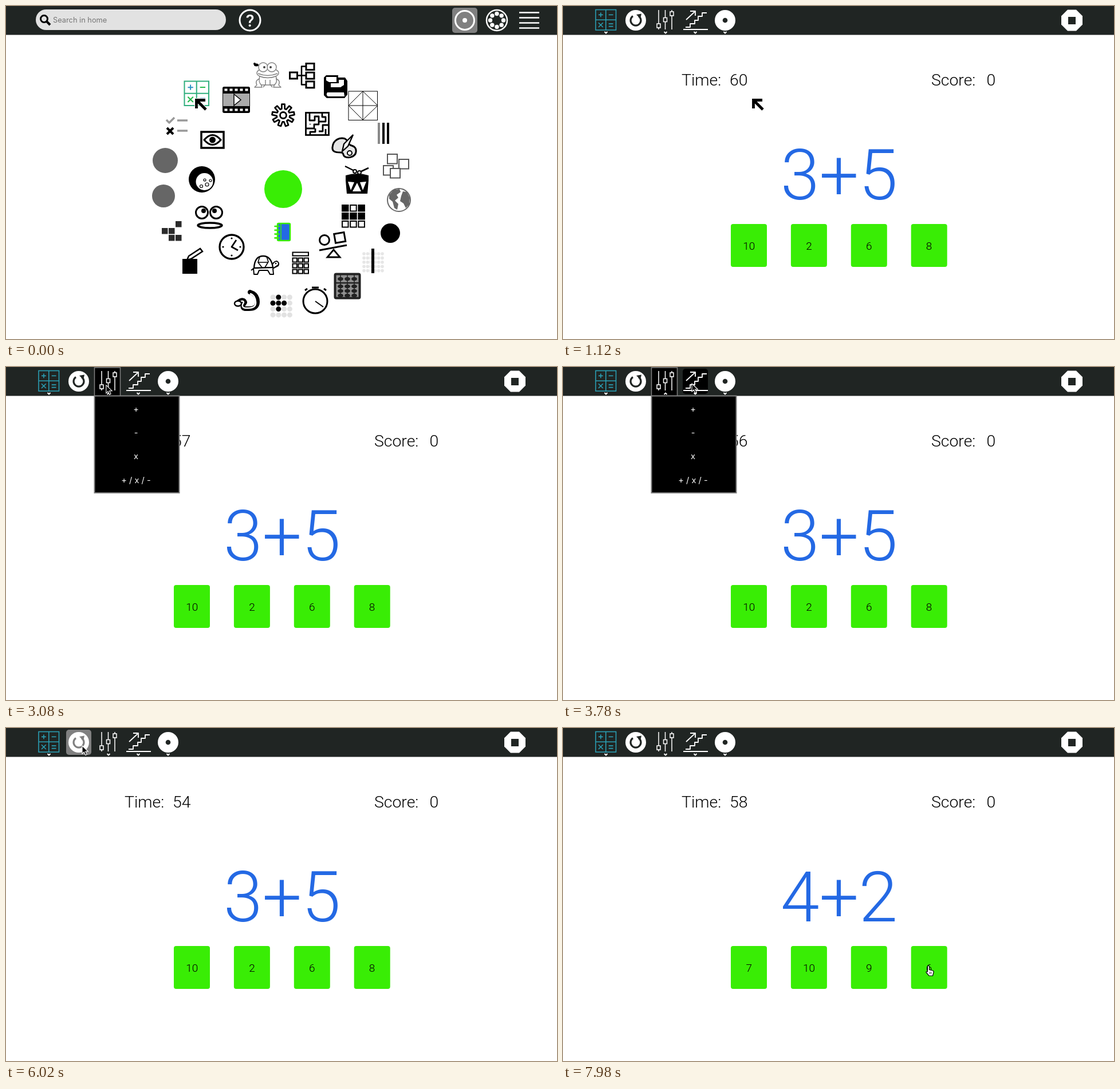
An HTML page that plays this animation: 962x582 px, repeating every 8 s.

```html
<!DOCTYPE html>
<html lang="en">
<head>
<meta charset="utf-8">
<title>Mental arithmetic</title>
<style>
html, body { margin: 0; width: 100%; height: 100%; overflow: hidden; background: #fff; }
svg { display: block; width: 962px; height: 582px; }
text { font-family: Roboto, "Liberation Sans", sans-serif; font-weight: 300; }
.ui { font-family: Inter, Roboto, sans-serif; font-weight: 400; }
</style>
</head>
<body>
<svg id="stage" viewBox="0 0 962 582" xmlns="http://www.w3.org/2000/svg"></svg>
<script>
const BAR = '#202523', GREY = '#808080', GREEN = '#39ed05', BLUE = '#2469e4', TEAL = '#2a9fb4';
const LOOP = 8000, STEP = 140, HOME_END = 700;

// SVG helpers: fill, stroke and stroke width follow the geometry
const paint = (f, s, w) => `fill="${f || 'none'}" stroke="${s || 'none'}" stroke-width="${w || 0}"`;
const rect = (x, y, w, h, f, s, sw, r = 0, more = '') =>
  `<rect x="${x}" y="${y}" width="${w}" height="${h}" rx="${r}" ${paint(f, s, sw)} ${more}/>`;
const circ = (x, y, r, f, s, sw) => `<circle cx="${x}" cy="${y}" r="${r}" ${paint(f, s, sw)}/>`;
const oval = (x, y, rx, ry, f, s, sw) =>
  `<ellipse cx="${x}" cy="${y}" rx="${rx}" ry="${ry}" ${paint(f, s, sw)}/>`;
const path = (d, f, s, sw, more = '') => `<path d="${d}" ${paint(f, s, sw)} ${more}/>`;
const line = (d, s = '#000', w = 2, cap = 'butt') =>
  path(d, '', s, w, `stroke-linecap="${cap}" stroke-linejoin="round"`);
const text = (x, y, size, str, more = '') =>
  `<text x="${x}" y="${y}" font-size="${size}" ${more}>${str}</text>`;
const group = (id, body, more = '') => `<g id="${id}" ${more}>${body}</g>`;
const times = (n, fn) => Array.from({ length: n }, (_, i) => fn(i)).join('');
const grid = (cols, rows, fn) => times(rows, j => times(cols, i => fn(i, j)));
const ring = (x, y, r, n, fn) => times(n, i => {
  const a = i * 2 * Math.PI / n;
  return fn(x + r * Math.cos(a), y + r * Math.sin(a));
});
const mid = 'text-anchor="middle"';

function sums(x, y, size, colors, w) {
  const [box, plus, minus, mul, eq] = colors;
  const q = size / 4, a = size * .11;
  const lx = x + q, rx = x + 3 * q, ty = y + q, by = y + 3 * q;
  return rect(x, y, size, size, '', box, w) +
    line(`M${x + 2 * q} ${y}v${size}M${x} ${y + 2 * q}h${size}`, box, w) +
    line(`M${lx - a} ${ty}h${2 * a}M${lx} ${ty - a}v${2 * a}`, plus, w) +
    line(`M${rx - a} ${ty}h${2 * a}`, minus, w) +
    line(`M${lx - a} ${by - a}l${2 * a} ${2 * a}m0 ${-2 * a}l${-2 * a} ${2 * a}`, mul, w) +
    line(`M${rx - a} ${by - 2}h${2 * a}m0 4.5h${-2 * a}`, eq, w);
}

function gear(x, y) {
  const teeth = 9, at = (r, a) => `${(x + r * Math.cos(a)).toFixed(1)} ${(y + r * Math.sin(a)).toFixed(1)}`;
  const d = Array.from({ length: teeth }, (_, i) => {
    const a = i * 2 * Math.PI / teeth - Math.PI / 2;
    return [at(11.5, a - .24), at(19.5, a - .13), at(19.5, a + .13), at(11.5, a + .24)].join('L');
  }).join('L');
  return path(`M${d}Z`, '#fff', '#000', 2.8, 'stroke-linejoin="round"') + circ(x, y, 5.5, '', '#000', 2.8);
}

function homeBar() {
  return rect(0, 0, 962, 50.5, BAR) + rect(52, 6, 332, 36, '#e2e2e2', '', 0, 18) +
    circ(66.5, 22.5, 6, '', '#000', 3) + line('M71 27l6 6', '#000', 4) +
    text(82, 29, 12.8, 'Search in home', 'class="ui" fill="#757575"') +
    circ(426, 25, 18, '', '#fff', 3) +
    text(426, 35.5, 30, '?', `${mid} fill="#fff" style="font-weight:500"`) +
    rect(779, 3, 44, 44, GREY, '', 0, 5) + circ(801, 25, 16.5, '', '#fff', 3) + circ(801, 25, 4, '#fff') +
    circ(857, 25, 18, '', '#fff', 2.5) + ring(857, 25, 11.5, 8, (x, y) => circ(x, y, 3.7, '#fff')) +
    times(4, i => line(`M896 ${11.5 + i * 9}h35`, '#fff', 2.4));
}

function topIcons() {
  return sums(311.5, 131.5, 42.5, ['#2fae7d', '#2b93c4', '#20b84a', '#20b84a', '#2b7fd6'], 2) +
    // film
    rect(378, 141, 48, 46, '#000', '', 0, 3) + rect(379, 153, 46, 22, '#aaa') +
    times(5, i => rect(381.5 + i * 9, 144.5, 5, 4, '#fff') + rect(381.5 + i * 9, 179.5, 5, 4, '#fff')) +
    path('M398 154l12 10-12 10z', '#fff', '#000', 1.5) +
    // frog and fly
    path('M443 122q-3 12 3 16h22q7-4 3-16z', '#fff', GREY, 1.4) +
    oval(457, 117, 19, 8.5, '#fff', GREY, 1.4) +
    circ(449, 107, 8, '#fff', GREY, 1.4) + circ(464, 107, 8, '#fff', GREY, 1.4) +
    circ(451, 107, 2, '#444') + circ(462, 107, 2, '#444') + line('M440 118q17 7 34 0', GREY, 1.4) +
    line('M443 127q-9 3-5 11l-4 4h13l-2-5M471 127q9 3 5 11l4 4h-13l2-5', GREY, 1.4) +
    line('M449 142l4-5v-8M465 142l-4-5v-8', GREY, 1.4) +
    oval(437, 103, 4, 2.5, '#000') + circ(434, 101, 2, '#000') +
    // tree
    line('M509 121.5h14M516 121.5v-16h7M516 121.5v16h7', '#000', 2.5) +
    rect(495.5, 116, 13, 11, '', '#000', 3) +
    times(3, i => rect(524, 100.5 + i * 15.7, 14, 11, '', '#000', 3)) +
    // press
    path('M555 125l4-4h21v4h12l4 6v24l-5 6h-31l-5-5z', '#000') +
    path('M559 124h18v9h-13l-5-3z', '#fff') + path('M567 135h14v-6h9v9l-6 4h-17z', '#fff') +
    path('M561 151h29l1 7h-29q-4-3-1-7z', '#fff') +
    // shapes puzzle
    rect(598, 149, 50.5, 50.5, '', '#000', 1) +
    line('M598 174l25-25 26 25-26 25zM598 174h51M623 149v50', '#000', 1) +
    gear(484, 191) +
    // maze
    rect(523.5, 186.5, 40, 39, '', '#000', 2.8) +
    line('M530 186v14h9v-7h7v14h-8v7h-14M552 186v8h6v8h-12M564 208h-11v11h-7M531 226v-6h9v-6M531 207v-1', '#000', 2.8) +
    line('M558 226v-11', '#000', 2.8) +
    // palette
    path('M570 247c1-14 14-18 22-15 6 3 4 8 9 11 6 2 11 4 10 12-1 9-14 12-20 8-4-3 0-7-7-7-8 0-15-1-14-9z', '#e6e6e6', '#000', 3) +
    circ(600, 257, 4, '#fff', '#000', 2) +
    path('M606 225l-9 20-10 9 3-13z', '#fff', '#000', 2.3);
}

function rightIcons() {
  const tiles = [[666, 259], [686, 268], [659, 279], [671, 284]];
  return rect(649, 204, 4, 37, '#888') + rect(657, 204, 4, 37, '#000') + rect(665, 204, 4, 37, '#000') +
    tiles.map(([x, y]) => rect(x, y, 17, 16.5, '#fff', '#555', 2)).join('') +
    // drum
    path('M593 296q20-6 40 0v9l-2 23h-36l-2-23z', '#000') +
    path('M597 307l5 15 6-14zM605 324l8-15 7 15zM618 308l5 14 6-15z', '#fff') +
    line('M592 280l18 9M633 283l-17 8', '#000', 2.5) +
    circ(609, 289, 3, '#fff', '#000', 2) + circ(617, 291, 3, '#fff', '#000', 2) +
    // globe
    circ(686, 339, 20, '#fff', '#666', 2) +
    path('M669 330l8-9 10-1 2 5-7 5 3 5-6 5 6 6-2 10-5-3-3-11-6-5zM693 324l7 1 5 10-1 12-6 6-4-8-6-4 2-9z', '#666') +
    circ(671, 397, 17, '#000') +
    // tiles
    grid(3, 3, (i, j) => rect(587 + i * 14.2, 348 + j * 14, 10.5, 10.5, [0, 2, 3, 4, 5].includes(i + j * 3) ? '#000' : '#fff', '#000', 2)) +
    // balance
    circ(556, 409, 8.5, '', '#000', 3) +
    rect(574, 397, 17.5, 16, '', '#000', 3, 0, 'transform="rotate(-10 582 405)"') +
    line('M547 427l48-9', '#000', 3) + path('M572 426l-11 13h22z', '', '#000', 2.8) +
    grid(6, 5, (i, j) => circ(625 + i * 6.4, 433 + j * 7.4, 2.8, '#e6e6e6')) + rect(638, 424, 5, 43, '#000') +
    // abacus
    rect(574.5, 468.5, 43, 42, '#909090', '#222', 4, 2) + line('M575 484h42', '#222', 2.5) +
    times(3, i => line(`M${584 + i * 12} 470v40`, '#222', 1.5)) +
    grid(3, 4, (i, j) => oval(584 + i * 12, (j ? 482 : 477) + j * 8, 5, 3.3, '#222'));
}

function bottomIcons() {
  const black = ['10', '01', '11', '21', '12'];
  const bricks = ['20', '01', '11', '12', '22'];
  return circ(540, 516, 21, '', '#000', 3) + line('M540 516l14 10', '#000', 2) +
    line('M534 492h12M522 497l4-3M559 497l-4-3', '#000', 3) +
    grid(4, 4, (i, j) => circ(466 + i * 9.8, 509 + j * 10.3, 4.5, black.includes(`${i}${j}`) ? '#000' : '#e2e2e2')) +
    // snake
    line('M404 519q10-9 13-1-9 12 5 11 17 1 17-12 0-13-13-17', '#000', 8, 'round') +
    line('M406 519q8-6 9-1-7 11 8 10 14 0 13-11-1-11-9-14', '#fff', 2.5, 'round') +
    oval(405, 520, 6, 4.5, '#fff', '#000', 2.5) +
    // notes
    rect(308, 442, 26, 26, '#000') +
    path('M316 444l3-7 20-13 4 5-20 13z', '#fff', '#000', 2.5) +
    // bricks
    bricks.map(c => rect(272 + c[0] * 12, 376 + c[1] * 12, 10.5, 10.5, '#2b2b2b')).join('') +
    // clock
    circ(394, 421, 21, '', '#000', 3.3) + ring(394, 421, 15, 4, (x, y) => circ(x, y, 1.6, '#000')) +
    line('M402 409l-8 12 11 6', '#000', 2.8) +
    // turtle
    path('M433 458q1-21 16-21 14 0 17 20z', '#fff', '#000', 2.3) +
    line('M443 438l-3 10 7 9M455 438l3 9-6 10M440 448h18', '#000', 1.6) +
    line('M433 458l-5 4M432 459l1 10h6l3-7h15l4 7h6l-1-10 10-7M465 452q3-6 8-6 5 3 2 8l-8 4', '#000', 2) +
    circ(471, 450, 1.3, '#000') +
    // calculator
    rect(500.5, 430.5, 27.5, 6, '', '#000', 2) +
    grid(3, 3, (i, j) => rect(500.5 + i * 10, 440.5 + j * 10, 7.5, 7, '', '#000', 2));
}

function leftIcons() {
  const craters = [[351, 312, 3], [341, 315, 2.5], [357, 305, 2], [347, 304, 2]];
  return line('M280 199l5 5 9-9', '#999', 3.5) + line('M299 200h18M299 218h18', '#999', 3.5) +
    line('M281 213l11 11M292 213l-11 11', '#000', 4) +
    // eye
    rect(341, 220, 39, 28, '#fff', '#000', 3.5) + path('M346 234q14.5-17 29 0-14.500 17-29 0z', '#fff', '#000', 3) +
    circ(360.5, 234, 5.5, '#000') + circ(278, 270, 22, '#666') + circ(275, 332, 20, '#666') +
    // moon
    circ(342, 303, 23, '#000') + circ(346.5, 307, 15, '#fff') +
    craters.map(([x, y, r]) => circ(x, y, r, '#fff', '#000', 1.2)).join('') +
    // face
    circ(342, 361, 10.5, '#fff', '#000', 3) + circ(367, 361, 10.5, '#fff', '#000', 3) +
    circ(345, 358, 4, '#000') + circ(364, 358, 4, '#000') + oval(356, 383.5, 21, 4.5, '', '#000', 3.5);
}

function centre() {
  return circ(484, 320, 33, GREEN) + rect(474, 380, 22, 30, BLUE, GREEN, 2.5, 2) +
    line('M480 380v30', GREEN, 1.5) + times(4, i => line(`M469.5 ${385 + i * 6.8}h7`, GREEN, 2.6, 'round'));
}

const caret = (x, up) => line(up ? `M${x - 2.5} 48l2.5-2.5 2.5 2.5` : `M${x - 2.5} 45l2.5 2.5 2.5-2.5`, '#fff', 1.8);
const hoverBox = (id, x) => group(id, rect(x - 22, 3, 44, 44, '#000', '', 0, 5));

function menu(id, x, h, rows) {
  return group(id, rect(x + 1, 1, 45, 50, '#000', GREY, 1.5) + rect(x + 1, 50.5, 148, h, '#000', GREY, 2) +
    rows.map((r, i) => text(x + 73.5, 79 + i * 41.2, 14.6, r, `${mid} class="ui" fill="#fff"`)).join(''));
}

function appBar() {
  return rect(0, 0, 962, 50.5, BAR) + hoverBox('hRestart', 127) + hoverBox('hOps', 179) + hoverBox('hLevel', 231) +
    group('pressed', rect(105, 3, 44, 44, GREY, '', 0, 5)) +
    menu('mOps', 153.5, 169.5, ['+', '-', 'x', '+ / x / -']) +
    menu('mLevel', 206, 129, ['easy', 'medium', 'hard']) +
    sums(57, 6.5, 35.5, Array(5).fill(TEAL), 1.6) +
    circ(127, 25, 18, '#fff') +
    group('spin', path('M122 17.600a9 9 0 1 0 10 0', '', 'currentColor', 3.2) +
      path('M128 15l9-1.5-2 8.5z', 'currentColor'), `color="${BAR}"`) +
    line('M167 7v24M167 37v4M178.5 7v14M178.5 27v14M190 7v3M190 16v25', '#fff', 1.5) +
    rect(164, 31, 6, 7, '', '#fff', 1.5) + rect(175.5, 20.5, 6, 7, '', '#fff', 1.5) + rect(187, 10, 6, 7, '', '#fff', 1.5) +
    line('M210 41h43', '#fff', 1.8) +
    line('M214 37h8v-6h8v-6h6v-7h7v-6h8', '#fff', 1.8) + line('M215 24l15-14M222 9h9v8', '#fff', 1.8) +
    circ(283, 25, 18, '#fff') + circ(283, 25, 4.3, BAR) +
    caret(75) + caret(283) +
    group('cOps', caret(179)) + group('cOpsUp', caret(179, true)) +
    group('cLevel', caret(231)) + group('cLevelUp', caret(231, true)) +
    path('M881 6.5h15l11 11v15l-11 11h-15l-11-11v-15z', '#fff') + rect(882, 19, 13, 13, BAR);
}

const appBody = () =>
  text(207, 139, 28.4, 'Time:') + text(291, 139, 28.4, '60', 'id="time"') +
  text(643, 139, 28.4, 'Score:') + text(739.5, 139, 28.4, '0') +
  text(482, 338, 122, '', `id="sum" ${mid} fill="${BLUE}"`) +
  times(4, i => rect(293 + i * 104.9, 381, 63, 75, GREEN, '', 0, 4) +
    text(324.7 + i * 104.8, 425.5, 19, '', `id="card${i}" ${mid}`));

const bigArrow = 'M2.5 17V2.5H18M3 3l16 16';
const cursors =
  group('big', path(bigArrow, '', '#fff', 7) + path(bigArrow, '', '#000', 4.8)) +
  group('arrow', path('M0 0v14l3.3-3 2.5 5.5 2.5-1.2-2.5-5.3h4.5z', '#000', '#fff', 1.1)) +
  group('hand', path('M-1.5 1.5q1.5-2 3 0v6l6 1.5q2 .5 1.5 3l-1.5 6h-6.5l-5-6q0-2.5 2.5-1z', '#fff', '#000', 1.2) +
    line('M2.5 11v4M4.8 11v4', '#000', .8));

document.getElementById('stage').innerHTML =
  group('home', homeBar() + topIcons() + rightIcons() + bottomIcons() + leftIcons() + centre()) +
  group('app', appBody() + appBar()) + group('cursor', cursors);

// time, x, y of the pointer tip
const moves = [[0, 330, 162], [1260, 330, 162], [2240, 169, 32], [2940, 169, 32], [3640, 225, 29],
  [4480, 225, 29], [4760, 230, 29], [5320, 230, 29], [5880, 133, 31], [6300, 133, 31], [7420, 638, 415], [8000, 638, 415]];
const ticks = [[0, 60], [1680, 59], [2380, 58], [3080, 57], [3780, 56], [4620, 55], [5460, 54],
  [6160, 60], [6860, 59], [7560, 58]];
const rounds = [{ sum: '3+5', cards: [10, 2, 6, 8] }, { sum: '4+2', cards: [7, 10, 9, 6] }];

const $ = id => document.getElementById(id);
const show = (id, on) => { $(id).style.display = on ? '' : 'none'; };
const within = (t, a, b) => t >= a && t < b;

function pointer(t) {
  const i = Math.max(1, moves.findIndex(m => m[0] > t));
  const [t0, x0, y0] = moves[i - 1], [t1, x1, y1] = moves[i];
  const p = (t - t0) / (t1 - t0), e = p * p * (3 - 2 * p);
  return [x0 + (x1 - x0) * e, y0 + (y1 - y0) * e];
}

function draw(t) {
  const [x, y] = pointer(t), inBar = y < 50;
  const home = t < HOME_END;
  const ops = within(t, 2660, 4060), level = within(t, 4060, 5460), pressed = within(t, 6020, 6160);
  const over = bx => inBar && Math.abs(x - bx) < 22;
  const card = y > 381 && y < 456 && x > 293 && (x - 293) % 104.9 < 63;
  const round = rounds[t < 6160 ? 0 : 1];

  show('home', home);
  show('app', !home);
  show('mOps', ops); show('cOps', !ops); show('cOpsUp', ops);
  show('mLevel', level); show('cLevel', !level); show('cLevelUp', level);
  show('hRestart', over(127) && !pressed);
  show('hOps', over(179) && !ops);
  show('hLevel', over(231) && !level);
  show('pressed', pressed);
  $('spin').setAttribute('color', pressed ? GREY : BAR);
  $('time').textContent = ticks.filter(k => k[0] <= t).pop()[1];
  $('sum').textContent = round.sum;
  round.cards.forEach((n, i) => { $('card' + i).textContent = n; });

  show('arrow', inBar);
  show('hand', card);
  show('big', !inBar && !card);
  $('cursor').setAttribute('transform', `translate(${x.toFixed(1)} ${y.toFixed(1)})`);
}

const start = performance.now();
function frame() {
  const t = (performance.now() - start) % LOOP;
  draw(Math.floor(t / STEP) * STEP);
  requestAnimationFrame(frame);
}
draw(0);
requestAnimationFrame(frame);
</script>
</body>
</html>
```
